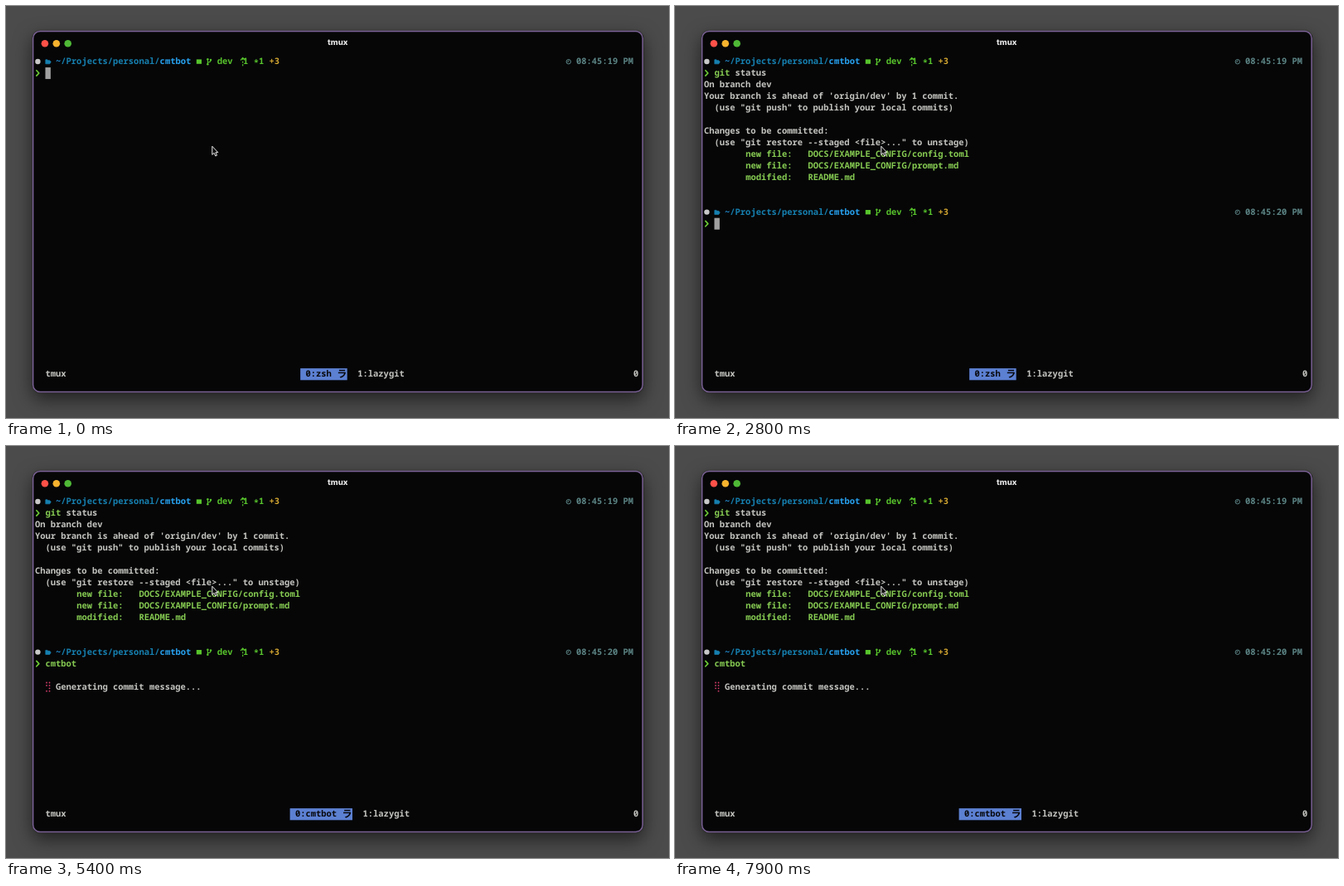
These frames come from a looping animation (800x497 px, 8000 ms). An HTML page:

```html
<!DOCTYPE html>
<html lang="en">
<head>
<meta charset="utf-8">
<title>tmux</title>
<style>
  html, body { margin: 0; width: 100%; height: 100%; overflow: hidden; background: #4b4b4b; }
  .window {
    position: absolute; left: 32px; top: 30px; width: 736.6px; height: 435.8px;
    border-radius: 9px; background: #060607;
    box-shadow: 0 8px 22px rgba(0, 0, 0, .58), 0 0 2px rgba(0, 0, 0, .6);
  }
  svg { position: absolute; left: 0; top: 0; width: 800px; height: 497px; }
  text {
    font: 600 10.467px "Noto Sans Mono", "DejaVu Sans Mono", monospace;
    white-space: pre; text-rendering: geometricPrecision; font-variant-ligatures: none;
  }
  .bold { font-weight: 800; }
  .kana { font: 700 12px "Noto Sans CJK JP", "Noto Sans CJK", sans-serif; }
  .title { font: 800 9.6px Inter, "Open Sans", sans-serif; }
</style>
</head>
<body>
<div class="window"></div>
<svg id="stage" viewBox="0 0 800 497"></svg>
<script>
const LOOP = 8000;
const CELL = 6.28, LINE = 13.97, LEFT = 34.9, TOP = 60.1;
const INK = "#c4c4c0", GREEN = "#58c42c", LIME = "#86cb52", BLUE = "#1680b0",
      BRIGHT = "#27a1ee", YELLOW = "#d5a831", TEAL = "#5c8484", BAR = "#5c80d2",
      DARK = "#08080c";

const stage = document.getElementById("stage");
const col = c => LEFT + c * CELL;
const row = r => TOP + r * LINE;

function add(parent, tag, attrs, content) {
  const el = document.createElementNS("http://www.w3.org/2000/svg", tag);
  for (const key in attrs) el.setAttribute(key, attrs[key]);
  if (content) el.textContent = content;
  parent.appendChild(el);
  return el;
}
const group = (parent = stage) => add(parent, "g", {});
const show = (el, on) => el.setAttribute("visibility", on ? "visible" : "hidden");

function write(parent, c, r, content, fill = INK, cls = "") {
  return add(parent, "text", { x: col(c), y: row(r) + 10.1, fill, class: cls }, content);
}
function stroke(parent, d, color, width = 1) {
  return add(parent, "path", {
    d, fill: "none", stroke: color, "stroke-width": width,
    "stroke-linecap": "round", "stroke-linejoin": "round"
  });
}

function prompt(parent, r, clock) {
  const y = row(r), mid = y + 6.9;
  add(parent, "circle", { cx: 38.4, cy: mid, r: 3.2, fill: "#c8c8c8" });
  add(parent, "path", {
    d: `M47.8 ${mid - 2.2}h2.2l.9 .9h1.9l1.4 1.7l-1.4 2.4h-5z`, fill: BLUE, stroke: BLUE,
    "stroke-width": .7, "stroke-linejoin": "round"
  });
  write(parent, 4, r, "~", BRIGHT, "bold");
  write(parent, 5, r, "/Projects/personal/", BLUE);
  write(parent, 24, r, "cmtbot", BRIGHT, "bold");
  add(parent, "rect", { x: 229.8, y: mid - 2.6, width: 6.2, height: 5.4, fill: GREEN });

  stroke(parent, `M243.4 ${mid - 2.2}v5M247 ${mid - 1.4}q0 2.2 -3.6 2.6`, GREEN, 1.1);
  for (const [x, dy] of [[243.4, -2.8], [243.4, 3.2], [247, -2]])
    add(parent, "circle", { cx: x, cy: mid + dy, r: 1.25, fill: GREEN });

  write(parent, 35, r, "dev", GREEN);
  stroke(parent, `M283.4 ${mid - 2}l2.3 -2.6l2.3 2.6`, GREEN, 1.2);
  stroke(parent, `M285.7 ${mid - 3.6}v9`, GREEN, 1.2).setAttribute("stroke-dasharray", "1.2 2.4");
  write(parent, 40, r, "1", GREEN);
  write(parent, 42, r, "*", GREEN, "bold").setAttribute("dy", 1.4);
  write(parent, 43, r, "1", GREEN);
  write(parent, 45, r, "+3", YELLOW);

  add(parent, "circle", { cx: 678.8, cy: mid + .2, r: 2.7, fill: "none", stroke: TEAL, "stroke-width": 1 });
  stroke(parent, `M678.8 ${mid - 1.4}v1.7h-1.4`, TEAL, .8);
  write(parent, 104, r, clock, TEAL);

  const next = mid + LINE;
  stroke(parent, `M36.8 ${next - 3.2}l3 3.2l-3 3.2`, "#6ccb35", 1.7);
}

function tabs(first, name) {
  const g = group(), width = name.length + 4;
  add(g, "rect", { x: col(first), y: row(27) - .2, width: width * CELL, height: 14.2, fill: BAR });
  write(g, first + 1, 27, name, DARK);
  write(g, first + width - 2, 27, "ラ", DARK, "kana").setAttribute("dy", .9);
  write(g, first + width + 2, 27, "1:lazygit");
  return g;
}

// Window frame and title bar
add(stage, "rect", {
  x: 32.6, y: 30.6, width: 735.6, height: 434.8, rx: 8.5,
  fill: "none", stroke: "#7b6296", "stroke-width": 1.5
});
["#ff5148", "#f6b32e", "#4fb936"].forEach((fill, i) =>
  add(stage, "circle", { cx: 46.9 + i * 13.9, cy: 45.3, r: 4.3, fill }));
add(stage, "text", { x: 400.3, y: 47.2, fill: "#e6e6e6", class: "title", "text-anchor": "middle" }, "tmux");

// Status line
write(stage, 2, 27, "tmux", INK, "bold");
write(stage, 115, 27, "0");
const shellTab = tabs(51, "0:zsh");
const botTab = tabs(49, "0:cmtbot");

// Terminal contents
prompt(stage, 0, "08:45:19 PM");
const gitWord = write(stage, 2, 1, "", LIME);
const gitArg = write(stage, 6, 1, "");

const result = group();
[
  "On branch dev",
  "Your branch is ahead of 'origin/dev' by 1 commit.",
  "  (use \"git push\" to publish your local commits)",
  "",
  "Changes to be committed:",
  "  (use \"git restore --staged <file>...\" to unstage)"
].forEach((s, i) => write(result, 0, i + 2, s));
[
  ["new file:", "DOCS/EXAMPLE_CONFIG/config.toml"],
  ["new file:", "DOCS/EXAMPLE_CONFIG/prompt.md"],
  ["modified:", "README.md"]
].forEach(([kind, file], i) => {
  write(result, 8, i + 8, kind, LIME);
  write(result, 20, i + 8, file, LIME);
});
prompt(result, 13, "08:45:20 PM");
const botWord = write(stage, 2, 14, "", LIME);

const cursor = add(stage, "rect", { width: 6.4, height: 14, fill: "#a0a0a0" });

// Braille spinner: one of eight dots is missing, and the gap goes round
const busy = group();
write(busy, 4, 16, "Generating commit message...");
const ring = [[0, 0], [0, 1], [0, 2], [0, 3], [1, 3], [1, 2], [1, 1], [1, 0]];
const dots = ring.map(([x, y]) => add(busy, "circle", {
  cx: 49 + x * 3.5, cy: row(16) + 1.9 + y * 3.4, r: .9, fill: "#d23c68"
}));

// Mouse pointer
add(stage, "path", {
  d: "M248.8 169.2v10.2l2.3 -2.1l1.7 3.7l1.7 -.8l-1.6 -3.5h3z",
  fill: "#101010", stroke: "#e8e8e8", "stroke-width": 1, "stroke-linejoin": "round"
});

const GIT = { text: "git status", from: 100, step: 110, enter: 1600 };
const BOT = { text: "cmtbot", from: 3000, step: 170, enter: 4200 };
const RENAME = 4400, BUSY = 5200, TICK = 100;

function typed({ text, from, step }, t) {
  return text.slice(0, Math.max(0, Math.floor((t - from) / step) + 1));
}

function draw(t) {
  const git = typed(GIT, t), bot = typed(BOT, t);
  gitWord.textContent = git.slice(0, 3);
  gitArg.textContent = git.slice(4);
  botWord.textContent = bot;

  show(result, t >= GIT.enter);
  show(shellTab, t < RENAME);
  show(botTab, t >= RENAME);

  let place = [2 + git.length, 1];
  if (t >= GIT.enter) place = [2 + bot.length, 14];
  if (t >= BOT.enter) place = [0, 15];
  cursor.setAttribute("x", col(place[0]));
  cursor.setAttribute("y", row(place[1]));
  show(cursor, t < BUSY);

  const running = t >= BUSY;
  const gap = Math.floor((t - BUSY) / TICK) % ring.length;
  show(busy, running);
  dots.forEach((dot, i) => show(dot, running && i !== gap));
}

const start = performance.now();
function frame() {
  draw((performance.now() - start) % LOOP);
  requestAnimationFrame(frame);
}
frame();
</script>
</body>
</html>
```
